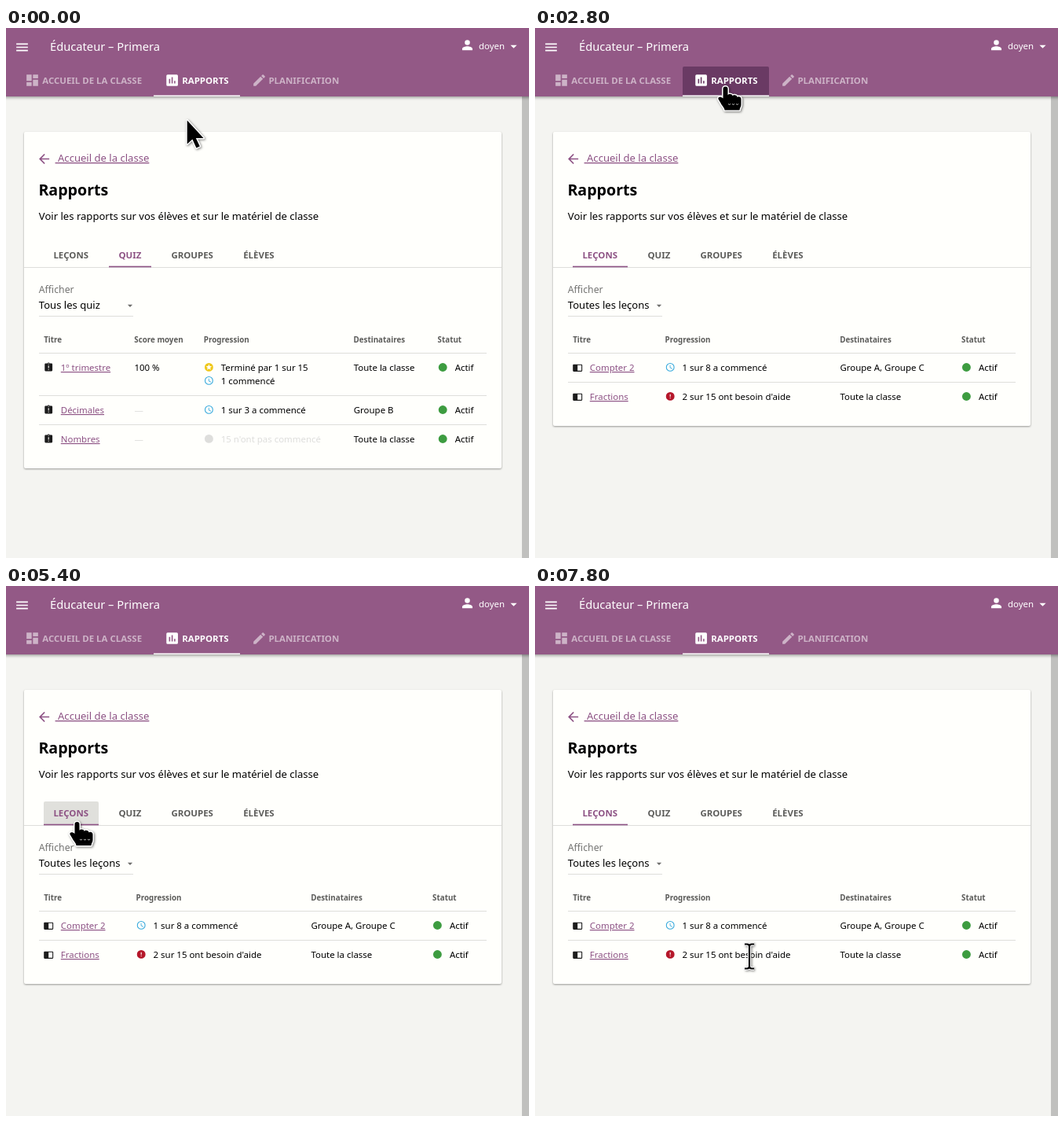
Recreate the animation shown at these times as an HTML page. Size 666x674 px, loop 8 s.

```html
<!DOCTYPE html>
<html lang="fr">
<head>
<meta charset="utf-8">
<title>Rapports</title>
<style>
  html, body { margin: 0; width: 100%; height: 100%; overflow: hidden; background: #f4f4f1; }
  svg { display: block; width: 666px; height: 674px; font-family: "Noto Sans", sans-serif; }
  text { white-space: pre; }
  .link { fill: #8d5284; text-decoration: underline; }
  .cursor { filter: drop-shadow(1px 1.5px 1.5px rgba(0, 0, 0, .5)); }
  .card { filter: drop-shadow(0 1px 1.2px rgba(0, 0, 0, .38)); }
  .bar { filter: drop-shadow(0 1px 2px rgba(0, 0, 0, .45)); }
</style>
</head>
<body>
<svg id="stage" viewBox="0 0 666 674" xmlns="http://www.w3.org/2000/svg"></svg>
<script>
const PURPLE = '#935986', LINK = '#8d5284', RULE = '#dededb', MUTED = '#5c5c5a';
const BODY = 11.45, BASE = 13.08, SMALL = 9.81;

const ICONS = {
  menu: 'M3 18h18v-2H3zM3 13h18v-2H3zM3 6v2h18V6z',
  board: 'M3 13h8V3H3zM3 21h8v-6H3zM13 21h8V11h-8zM13 3v6h8V3z',
  chart: 'M19 3H5a2 2 0 0 0-2 2v14a2 2 0 0 0 2 2h14a2 2 0 0 0 2-2V5a2 2 0 0 0-2-2zM9 17H7v-7h2zM13 17h-2V7h2zM17 17h-2v-4h2z',
  pencil: 'M3 17.25V21h3.75L17.81 9.94l-3.75-3.75zM20.71 7.04a1 1 0 0 0 0-1.41l-2.34-2.34a1 1 0 0 0-1.41 0l-1.83 1.83 3.75 3.75z',
  person: 'M12 12a4 4 0 0 0 0-8 4 4 0 0 0 0 8zM12 14c-2.67 0-8 1.34-8 4v2h16v-2c0-2.66-5.33-4-8-4z',
  drop: 'M7 10l5 5 5-5z',
  back: 'M20 11H7.83l5.59-5.59L12 4l-8 8 8 8 1.41-1.41L7.83 13H20z',
  quiz: 'M19 3h-4.2a3 3 0 0 0-5.6 0H5a2 2 0 0 0-2 2v14a2 2 0 0 0 2 2h14a2 2 0 0 0 2-2V5a2 2 0 0 0-2-2zM13 18h-2v-2h2zM13 14h-2V8h2zM12 5a1 1 0 0 1 0-2 1 1 0 0 1 0 2z',
  lesson: 'M21 4H3a2 2 0 0 0-2 2v13a2 2 0 0 0 2 2h18a2 2 0 0 0 2-2V6a2 2 0 0 0-2-2zM21 19h-9V6h9z',
  dot: 'M2 12a10 10 0 0 1 20 0 10 10 0 0 1-20 0z',
  clock: 'M2 12a10 10 0 0 1 20 0 10 10 0 0 1-20 0zM4 12a8 8 0 0 0 16 0 8 8 0 0 0-16 0zM12.5 7H11v6l5.25 3.15.75-1.23-4.5-2.67z',
  star: 'M2 12a10 10 0 0 1 20 0 10 10 0 0 1-20 0zM16.23 18l-1.12-4.82 3.73-3.23-4.92-.42L12 5l-1.92 4.54-4.92.42 3.73 3.23L7.77 18 12 15.45z',
  alert: 'M2 12a10 10 0 0 1 20 0 10 10 0 0 1-20 0zM13 17h-2v-2h2zM13 13h-2V7h2z'
};

const text = (x, y, s, size = BODY, fill = '#000', more = '') =>
  `<text x="${x}" y="${y}" font-size="${size}" fill="${fill}" ${more}>${s}</text>`;
const bold = (x, y, s, size, fill) => text(x, y, s, size, fill, 'font-weight="700"');
const link = (x, y, s, size = BODY) => text(x, y, s, size, LINK, 'class="link"');
const rect = (x, y, w, h, fill, more = '') =>
  `<rect x="${x}" y="${y}" width="${w}" height="${h}" fill="${fill}" ${more}/>`;
// Icons are 24-unit boxes placed by their centre.
const icon = (name, x, y, fill, size = 13.08) =>
  `<path d="${ICONS[name]}" fill="${fill}" fill-rule="evenodd" transform="translate(${x} ${y}) scale(${size / 24}) translate(-12 -12)"/>`;
const big = (name, x, y, fill = '#fff') => icon(name, x, y, fill, 19.62);

const navText = 'rgba(255,255,255,.54)';
const header = `
  <g class="bar">${rect(-6, -6, 678, 93, PURPLE)}</g>
  ${rect(188, 49, 110, 40, '#653660', 'id="navHover" rx="2" clip-path="inset(0 0 2px 0)"')}
  ${rect(188, 85.5, 110, 1.5, '#fff')}
  ${big('menu', 20.5, 24.5)}
  ${text(56, 28.7, 'Éducateur – Primera', 14.7, '#fff')}
  ${big('person', 587.5, 21.7)}
  ${text(602, 27, 'doyen', BODY, '#fff')}
  ${big('drop', 646.5, 23.3)}
  ${big('board', 33.5, 66.5, navText)}${bold(46.3, 71, 'ACCUEIL DE LA CLASSE', BODY, navText)}
  ${big('chart', 211.6, 66.5)}${bold(224.2, 71, 'RAPPORTS', BODY, '#fff')}
  ${big('pencil', 322.5, 66.5, navText)}${bold(334.4, 71, 'PLANIFICATION', BODY, navText)}`;

const cardHead = `
  ${big('back', 48.6, 166.5, LINK)}
  ${link(62.6, 170, '\u00a0Accueil de la classe', BASE)}
  ${bold(41.4, 213, 'Rapports', 19.62, '#000')}
  ${text(41.8, 244, 'Voir les rapports sur vos élèves et sur le matériel de classe', BASE)}
  ${rect(48, 274, 70, 30, '#dcdcd8', 'id="tabHover" rx="2"')}
  ${rect(23, 304, 608, 1, RULE)}
  ${text(41.8, 337, 'Afficher', 12.26, '#747472')}
  ${icon('drop', 158, 353, '#6e6e6c', 15)}
  ${rect(42, 366, 120, 1, RULE)}`;

const TABS = [['LEÇONS', 60.4, 48, 70], ['QUIZ', 143.5, 131, 54], ['GROUPES', 210.4], ['ÉLÈVES', 302.2]];
const tabs = active => TABS.map(([s, x], i) =>
    bold(x, 293, s, BODY, i === active ? LINK : MUTED)).join('') +
  rect(TABS[active][2], 302.7, TABS[active][3], 1.6, LINK);

const heads = (cols, names) =>
  cols.map((x, i) => bold(x, 400.3, names[i], SMALL, MUTED)).join('');
const rules = ys => ys.map(y => rect(42, y, 570, 1, RULE)).join('');
const status = (x, y) => icon('dot', x, y - 4.5, '#3d9c40') + text(x + 15.5, y, 'Actif');
const progress = (x, y, kind, fill, s, ink) => icon(kind, x, y - 4.6, fill) + text(x + 15.4, y, s, BODY, ink);

const BLUE = '#35a9dd', PALE = '#dededc';
const quizRow = (y, title, score, who) =>
  icon('quiz', 54.2, y - 4.5, '#1c1c1c') + link(69.8, y, title) +
  text(163.5, y, score, BODY, score === '—' ? PALE : '#000') +
  text(442.8, y, who) + status(556.2, y);
const quizzes = `<g id="quizzes">
  ${tabs(1)}
  ${text(41.8, 357, 'Tous les quiz', BASE)}
  ${heads([48.2, 163.3, 251.8, 442.5, 549.6], ['Titre', 'Score moyen', 'Progression', 'Destinataires', 'Statut'])}
  ${rules([413, 467, 504])}
  ${quizRow(436, '1º trimestre', '100 %', 'Toute la classe')}
  ${quizRow(490, 'Décimales', '—', 'Groupe B')}
  ${quizRow(527, 'Nombres', '—', 'Toute la classe')}
  ${progress(258.4, 436, 'star', '#efc81c', 'Terminé par 1 sur 15')}
  ${progress(258.4, 453, 'clock', BLUE, '1 commencé')}
  ${progress(258.4, 490, 'clock', BLUE, '1 sur 3 a commencé')}
  ${progress(258.4, 527, 'dot', PALE, "15 n'ont pas commencé", PALE)}
</g>`;

const lessonRow = (y, title, who) =>
  icon('lesson', 54.2, y - 4, '#1c1c1c') + link(69.8, y, title) + text(388.5, y, who) + status(549.4, y);
const lessons = `<g id="lessons">
  ${tabs(0)}
  ${text(41.8, 357, 'Toutes les leçons', BASE)}
  ${heads([48.2, 165.5, 388.2, 543.1], ['Titre', 'Progression', 'Destinataires', 'Statut'])}
  ${rules([413, 450])}
  ${lessonRow(436, 'Compter 2', 'Groupe A, Groupe C')}
  ${lessonRow(473, 'Fractions', 'Toute la classe')}
  ${progress(172.2, 436, 'clock', BLUE, '1 sur 8 a commencé')}
  ${progress(172.2, 473, 'alert', '#b5172a', "2 sur 15 ont besoin d'aide")}
</g>`;

const beam = 'M-6-15.5h3q3 0 3 3 0-3 3-3h3M0-13v26M-6 15.5h3q3 0 3-3 0 3 3 3h3';
const outlined = 'stroke="#fff" stroke-width="3" stroke-linejoin="round" paint-order="stroke"';
const cursors = `
  <g id="arrow" class="cursor"><path d="M.7 1.5V31.5L7.4 25.5 12.4 36.5 16.8 34.5 11.8 24H21.5z" ${outlined}/></g>
  <g id="hand" class="cursor">
    <path d="M-3 3a3 3 0 0 1 6 0v8c1-2 6-2 6 1 1-2 6-1.5 6 1.5 1-1.5 5-1 5 2.5v7c0 3-2 4-2 7H-1c0-3-3-5-5-9l-3-5c-1-3 3-4 6-1z" ${outlined}/>
    <path d="M3.5 22l1.5 1 1.5-1M8.5 22l1.5 1 1.5-1M13.5 22l1.5 1 1.5-1" fill="none" stroke="#ddd" stroke-width=".9"/>
  </g>
  <g id="beam" class="cursor" fill="none">
    <path d="${beam}" stroke="#fff" stroke-width="4.4"/><path d="${beam}" stroke="#000" stroke-width="2.2"/>
  </g>`;

document.getElementById('stage').innerHTML =
  rect(0, 0, 666, 674, '#f4f4f1') + rect(657, 80, 9, 594, '#c0c0be') + header +
  `<g class="card">${rect(23, 132, 608, 428, '#fffffc', 'id="card" rx="2"')}</g>` +
  cardHead + quizzes + lessons + cursors;

const LOOP = 8000, SWITCH = 2800;
// time, cursor, x, y
const POINTER = [
  [0, 'arrow', 230, 116], [600, 'arrow', 234, 116], [800, 'arrow', 239.5, 87],
  [1000, 'hand', 254, 64], [1200, 'hand', 242.5, 74.5], [3400, 'hand', 242.5, 73.5],
  [4400, 'hand', 241.5, 74.5], [4600, 'hand', 242.5, 95], [4800, 'arrow', 141, 176],
  [5000, 'beam', 106.5, 226], [5200, 'hand', 90.5, 296], [5400, 'hand', 90.5, 300],
  [5600, 'hand', 89, 296], [5800, 'hand', 89, 295], [6200, 'hand', 89.5, 293],
  [7000, 'arrow', 80, 376], [7200, 'arrow', 81.5, 405], [7400, 'hand', 84, 427],
  [7600, 'beam', 211, 464], [7800, 'beam', 273, 471]
];
// time, opacity
const NAV = [[0, 0], [1000, .05], [1200, 1], [2800, .88], [3000, 1], [4800, .1], [5000, 0]];
const TAB = [[0, 0], [5400, .88], [5600, 1], [7200, .1], [7400, 0]];

const $ = id => document.getElementById(id);
const at = (steps, t) => steps.filter(s => s[0] <= t).pop();
const show = (id, on) => { $(id).style.display = on ? '' : 'none'; };

function draw(now) {
  const t = now % LOOP;
  const [, kind, x, y] = at(POINTER, t);
  for (const id of ['arrow', 'hand', 'beam']) show(id, id === kind);
  $(kind).setAttribute('transform', `translate(${x} ${y})`);
  $('navHover').style.opacity = at(NAV, t)[1];
  $('tabHover').style.opacity = at(TAB, t)[1];
  show('quizzes', t < SWITCH);
  show('lessons', t >= SWITCH);
  $('card').setAttribute('height', t < SWITCH ? 428 : 374);
}

const start = performance.now();
function tick() {
  draw(performance.now() - start);
  requestAnimationFrame(tick);
}
tick();
</script>
</body>
</html>
```
